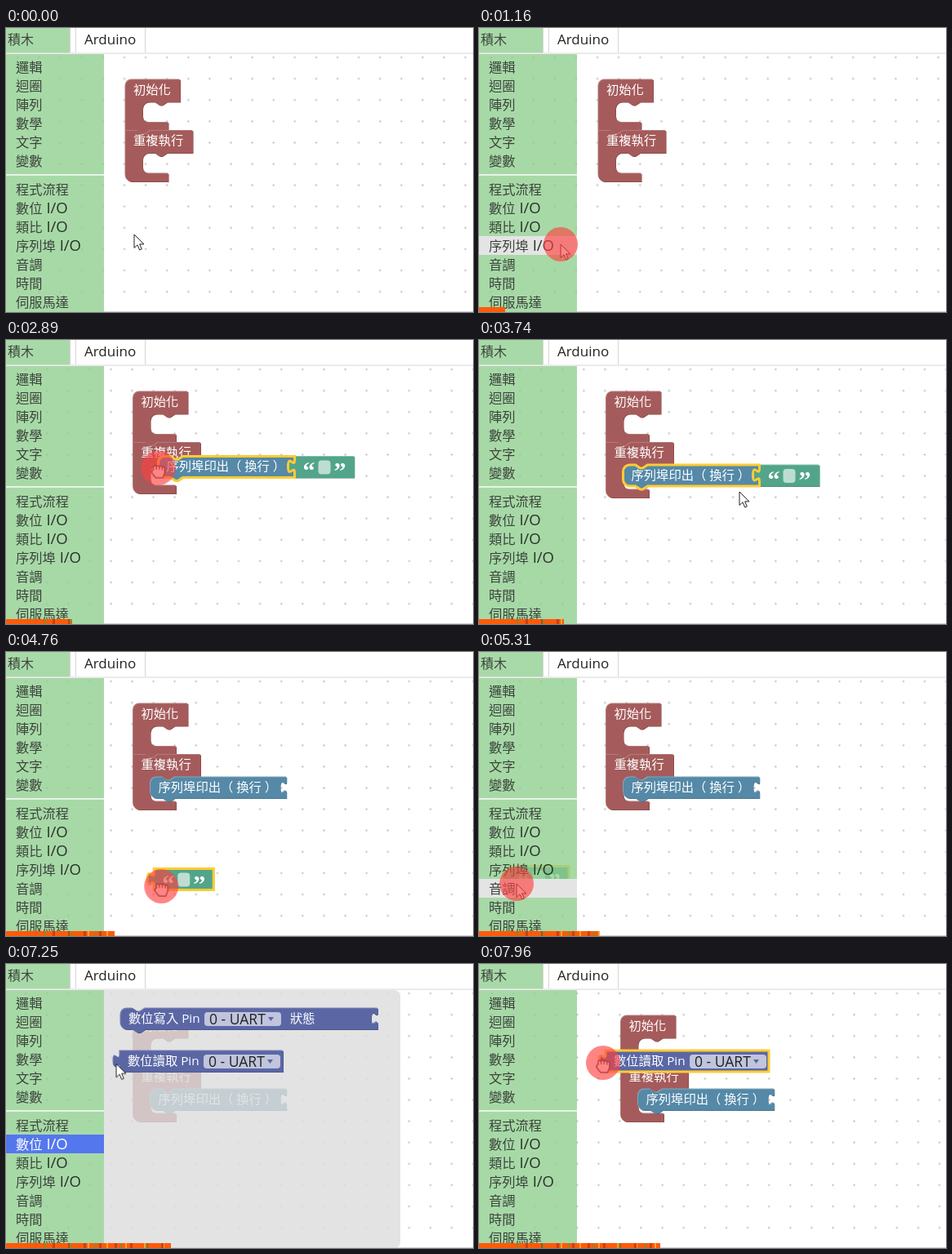
An HTML page that plays this animation: 572 by 348 pixels, repeating every 8 s.

```html
<!DOCTYPE html>
<html lang="zh-Hant">
<head>
<meta charset="utf-8">
<title>積木</title>
<style>
html, body { margin: 0; width: 100%; height: 100%; overflow: hidden; background: #fff; }
svg { position: absolute; left: 0; top: 0; display: block; }
text { font-family: "Open Sans", "Noto Sans CJK TC", "Noto Sans CJK", sans-serif; white-space: pre; }
.menu text { font-size: 16.3px; font-weight: 300; fill: #3c443c; }
.menu tspan { font-size: 18.5px; font-weight: 400; fill: #2a302a; }
.menu .picked text, .menu .picked tspan { fill: #fff; }
.block text { font-size: 15.3px; fill: #fff; }
.block .value { font-size: 17.5px; fill: #222; }
.block .quote { font: bold 30px "Liberation Serif", serif; }
.light { filter: brightness(1.25) saturate(.6); }
.dark { filter: brightness(.72); }
.tab { font-size: 17px; fill: #222; }
.tab.current { font-size: 16px; font-weight: 300; fill: #3c443c; }

/* every part shares one 8 s loop; steps are hard changes */
.ws, .fly1, .fly2, .drag1, .drag2, .drag3, .empty, .placed, .joined, .hover, .ring, .arrow, .fist {
  animation: 8s step-end infinite;
}
.ws { animation-name: shift; }
.fly1 { animation-name: fly1; }
.fly2 { animation-name: fly2; }
.drag1 { animation-name: drag1; }
.drag2 { animation-name: drag2; }
.drag3 { animation-name: drag3; }
.empty { animation-name: empty; }
.placed { animation-name: placed; }
.joined { animation-name: joined; }
.hover { animation-name: hover; }
.ring { animation-name: press; }
.arrow { animation-name: arrow; }
.fist { animation-name: fist; }
.pointer { animation: pointer 8s ease-in-out infinite; }

@keyframes shift {
  0% { transform: translateX(0); }
  22.5% { transform: translateX(9.5px); }
  97.5%, 100% { transform: translateX(27.5px); }
}
@keyframes fly1 { 0% { opacity: 0; } 15.5% { opacity: 1; } 22.5%, 100% { opacity: 0; } }
@keyframes fly2 { 0% { opacity: 0; } 83.75% { opacity: 1; } 97.5%, 100% { opacity: 0; } }
@keyframes drag1 { 0% { opacity: 0; } 22.5% { opacity: 1; } 39.4%, 100% { opacity: 0; } }
@keyframes drag2 { 0% { opacity: 0; } 55% { opacity: 1; } 66.9%, 100% { opacity: 0; } }
@keyframes drag3 { 0% { opacity: 0; } 97.5%, 100% { opacity: 1; } }
@keyframes empty { 0% { opacity: 1; } 39.4%, 100% { opacity: 0; } }
@keyframes placed { 0% { opacity: 0; } 39.4%, 100% { opacity: 1; } }
@keyframes joined { 0% { opacity: 0; } 39.4% { opacity: 1; } 55%, 100% { opacity: 0; } }
@keyframes hover {
  0% { transform: translateY(-60px); }
  7.5% { transform: translateY(255px); }
  15.5% { transform: translateY(-60px); }
  64.5% { transform: translateY(278px); }
  71.2% { transform: translateY(255px); }
  73.2% { transform: translateY(232px); }
  76.2% { transform: translateY(209px); }
  83.75%, 100% { transform: translateY(-60px); }
}
@keyframes press {
  0% { opacity: 0; }
  13.75% { opacity: 1; }
  15.5% { opacity: 0; }
  21.5% { opacity: 1; }
  39.4% { opacity: 0; }
  54.1% { opacity: 1; }
  66.9% { opacity: 0; }
  82% { opacity: 1; }
  83.75% { opacity: 0; }
  96.25%, 100% { opacity: 1; }
}
@keyframes arrow {
  0% { opacity: 1; }
  22.5% { opacity: 0; }
  39.4% { opacity: 1; }
  55% { opacity: 0; }
  66% { opacity: 1; }
  97.5%, 100% { opacity: 0; }
}
@keyframes fist {
  0% { opacity: 0; }
  22.5% { opacity: 1; }
  39.4% { opacity: 0; }
  55% { opacity: 1; }
  66% { opacity: 0; }
  97.5%, 100% { opacity: 1; }
}
@keyframes pointer {
  0%, 2.5% { transform: translate(157px, 253px); }
  9.4%, 15.5% { transform: translate(100px, 265px); }
  20.6%, 22.5% { transform: translate(140px, 226px); }
  27.25% { transform: translate(147px, 230px); }
  36.9%, 39.4% { transform: translate(187px, 156px); animation-timing-function: ease-in; }
  43% { transform: translate(235px, 176px); animation-timing-function: ease-out; }
  46.75% { transform: translate(319px, 186px); }
  51.9%, 55% { transform: translate(353px, 174.5px); animation-timing-function: ease-in; }
  60% { transform: translate(160px, 308px); animation-timing-function: ease-out; }
  63.75%, 69.5% { transform: translate(46px, 284px); }
  75.1% { transform: translate(62px, 234px); }
  78.75%, 83.75% { transform: translate(59px, 225px); }
  91.25%, 97.5% { transform: translate(136px, 121px); animation-timing-function: ease-out; }
  99.5%, 100% { transform: translate(152px, 121px); }
}

.bar {
  position: absolute; left: 0; top: 342px; width: 0; height: 6px;
  background:
    repeating-linear-gradient(90deg, transparent 0 13px, #8a8a2a 13px 15px, transparent 15px 31px) 34px 0 no-repeat,
    repeating-linear-gradient(90deg, transparent 0 7px, #c8401a 7px 10px, transparent 10px 19px) 50px 0 no-repeat,
    repeating-linear-gradient(90deg, transparent 0 17px, #ffa030 17px 19px, transparent 19px 23px) 60px 0 no-repeat,
    #ff5a08;
  animation: grow 8s linear infinite;
}
@keyframes grow { to { width: 223.2px; } }
</style>
</head>
<body>
<svg width="572" height="348" viewBox="0 0 572 348">
  <defs>
    <pattern id="dots" x="132" y="23" width="26.1" height="26.1" patternUnits="userSpaceOnUse">
      <path d="M11.5 13h3M13 11.5v3" stroke="#c8c8c8"/>
    </pattern>
  </defs>

  <g class="ws">
    <rect x="-40" y="32" width="680" height="316" fill="url(#dots)"/>
    <g id="scene"></g>
  </g>
  <g class="fly1" id="serial"></g>
  <g class="fly2" id="digital"></g>
  <g class="pointer" id="dragged"></g>

  <g class="menu" id="menu">
    <rect y="32" width="120" height="316" fill="#8ccd8c" fill-opacity=".76"/>
    <path d="M0 180h120" stroke="#e6f3e6" stroke-width="2"/>
    <rect class="hover" width="120" height="23" fill="#e4e4e4"/>
  </g>

  <rect width="572" height="31" fill="#fff"/>
  <rect width="78" height="30.5" fill="#a8d9a8"/>
  <path d="M78.5 0V30M85.5 0V30M170.5 0V30M0 31H572M120 347.5H572" stroke="#d6d6d6" fill="none"/>
  <text class="tab current" x="2" y="20">積木</text>
  <text class="tab" x="96" y="20">Arduino</text>
</svg>
<div class="bar"></div>
<svg width="572" height="348" viewBox="0 0 572 348">
  <g class="pointer">
    <path class="arrow" d="M0 0V16.5l4-3.7 2.7 6.2 2.6-1.1-2.6-6H12z" fill="#fff" stroke="#222"/>
    <g transform="translate(0 3) scale(1.2)">
      <path class="fist" d="M-5-1v-3q1.500-2 3 0q1.500-2 3 0q1.500-1.500 3 .5q2-1 2.500 1v5l-2 5h-7l-4-5q-1-2 1.500-3.500zM-2-4v3M1-4v3M4-3.500v3" fill="#fff" stroke="#222"/>
    </g>
    <circle class="ring" r="21" fill="#ff4040" fill-opacity=".64"/>
  </g>
</svg>
<script>
const RED = '#a55b5b', BLUE = '#5589a7', GREEN = '#52a58a', VIOLET = '#5b67a5';
const SOCKET = 'v5c0 10-8-8-8 7.5s8-2.500 8 7.5';
const TOP_NOTCH = 'H15l6 4h3l6-4', BOTTOM_NOTCH = 'H30l-6 4h-3l-6-4';
const byId = id => document.getElementById(id);

function add(parent, tag, attrs = {}, label = '') {
  const el = document.createElementNS('http://www.w3.org/2000/svg', tag);
  for (const key in attrs) el.setAttribute(key, attrs[key]);
  el.textContent = label;
  return parent.appendChild(el);
}

const group = (parent, name) => add(parent, 'g', { class: name });

// Outlines: stacked command, value with a left tab, C-shaped container
const command = (w, socket = '') =>
  `M0 8A8 8 0 0 1 8 0${TOP_NOTCH}H${w}${socket}V26${BOTTOM_NOTCH}H8a8 8 0 0 1-8-8z`;
const value = w => `M0 0H${w}V26H0V20c0-10-8 8-8-7.5s8 2.500 8-7.5z`;
const container = (w, inner, last) =>
  (last ? `M0 0${TOP_NOTCH}` : 'M0 8A8 8 0 0 1 8 0') +
  `H${w}V27.5H51l-6 4h-3l-6-4h-7a8 8 0 0 0-8 8v${inner - 16}a8 8 0 0 0 8 8H52.5v10` +
  (last ? 'H8a8 8 0 0 1-8-8z' : `${BOTTOM_NOTCH}H0z`);

// Offset copies give the light upper and dark lower edge
function block(parent, x, y, d, fill, label = '') {
  const g = add(parent, 'g', { class: 'block', transform: `translate(${x} ${y})` });
  add(g, 'path', { d, fill, class: 'dark', transform: 'translate(1 1)' });
  add(g, 'path', { d, fill, class: 'light', transform: 'translate(-.5 -.5)' });
  add(g, 'path', { d, fill, transform: 'translate(.5 .5)' });
  add(g, 'text', { x: 10, y: 17.5 }, label);
  return g;
}

const select = (g, d) => add(g, 'path', { d, fill: 'none', stroke: '#fc3', 'stroke-width': 3 });

function field(g, x, w, label, arrow) {
  add(g, 'rect', { x, y: 5, width: w, height: 17, rx: 4, fill: '#fff', 'fill-opacity': .62 });
  add(g, 'text', { x: x + 6, y: 19.5, class: 'value' }, label);
  if (arrow) add(g, 'path', { d: `M${x + w - 16} 11h7l-3.500 5z`, fill: VIOLET });
}

function textBlock(parent, x, y, selected) {
  const g = block(parent, x, y, value(73), GREEN);
  add(g, 'text', { x: 10, y: 28, class: 'quote' }, '“');
  add(g, 'text', { x: 48, y: 28, class: 'quote' }, '”');
  field(g, 29, 15, '');
  if (selected) select(g, value(73));
}

const PRINT = command(167, SOCKET);
const printBlock = (parent, x, y, label = '序列埠印出（ 換行 ）', w = 167) =>
  block(parent, x, y, command(w, SOCKET), BLUE, label);

function printLine(parent, x, y, selected) {
  const g = printBlock(parent, x, y);
  textBlock(parent, x + 167, y);
  if (selected) select(parent.appendChild(g), PRINT);
}

function readBlock(parent, x, y, selected) {
  const g = block(parent, x, y, value(200), VIOLET, '數位讀取 Pin');
  field(g, 103, 94, '0 - UART', true);
  if (selected) select(g, value(200));
}

function scene(root) {
  block(root, 146, 63, container(67, 25, false), RED, '初始化');
  block(group(root, 'empty'), 146, 125.5, container(82.5, 25, true), RED, '重複執行');
  const placed = group(root, 'placed');
  block(placed, 146, 125.5, container(82.5, 30, true), RED, '重複執行');
  printBlock(placed, 167, 153);
  printLine(group(root, 'joined'), 167, 153, true);
}

function panel(root, right) {
  add(root, 'path', { d: `M120 32H${right - 8}q8 0 8 8V340q0 8-8 8H120z`, fill: '#ddd', 'fill-opacity': .82 });
}

function serialPanel(root) {
  panel(root, 408);
  field(block(root, 140, 54, command(180), BLUE, '序列埠 鮑率'), 103, 66, '9600', true);
  block(root, 140, 106, value(120), BLUE, '序列埠可讀取');
  printBlock(root, 140, 158, '序列埠印出', 105);
  textBlock(root, 245, 158);
  printLine(root, 140, 211.5);
  block(root, 140, 263, value(105), BLUE, '序列埠讀取');
}

function digitalPanel(root) {
  panel(root, 483);
  const g = block(root, 140, 54, command(315, SOCKET), VIOLET, '數位寫入 Pin');
  field(g, 103, 94, '0 - UART', true);
  add(g, 'text', { x: 208, y: 17.5 }, '狀態');
  readBlock(root, 139, 106);
}

function menu(root) {
  const row = (parent, label, y) => {
    const [name, suffix] = label.split(' ');
    const text = add(parent, 'text', { x: 12, y: y + 6 }, name);
    if (suffix) add(text, 'tspan', {}, ' ' + suffix);
  };
  const picked = (name, label, y) => {
    const g = group(group(root, name), 'picked');
    add(g, 'rect', { y: y - 12, width: 120, height: 23, fill: '#57e' });
    row(g, label, y);
  };
  ['邏輯', '迴圈', '陣列', '數學', '文字', '變數'].forEach((s, i) => row(root, s, 48 + 23 * i));
  ['程式流程', '數位 I/O', '類比 I/O', '序列埠 I/O', '音調', '時間', '伺服馬達']
    .forEach((s, i) => row(root, s, 198 + 23 * i));
  picked('fly1', '序列埠 I/O', 267);
  picked('fly2', '數位 I/O', 221);
}

scene(byId('scene'));
serialPanel(byId('serial'));
digitalPanel(byId('digital'));
printLine(group(byId('dragged'), 'drag1'), 0, -14.5, true);
textBlock(group(byId('dragged'), 'drag2'), -9, -21.5, true);
readBlock(group(byId('dragged'), 'drag3'), 3, -15, true);
menu(byId('menu'));
</script>
</body>
</html>
```
